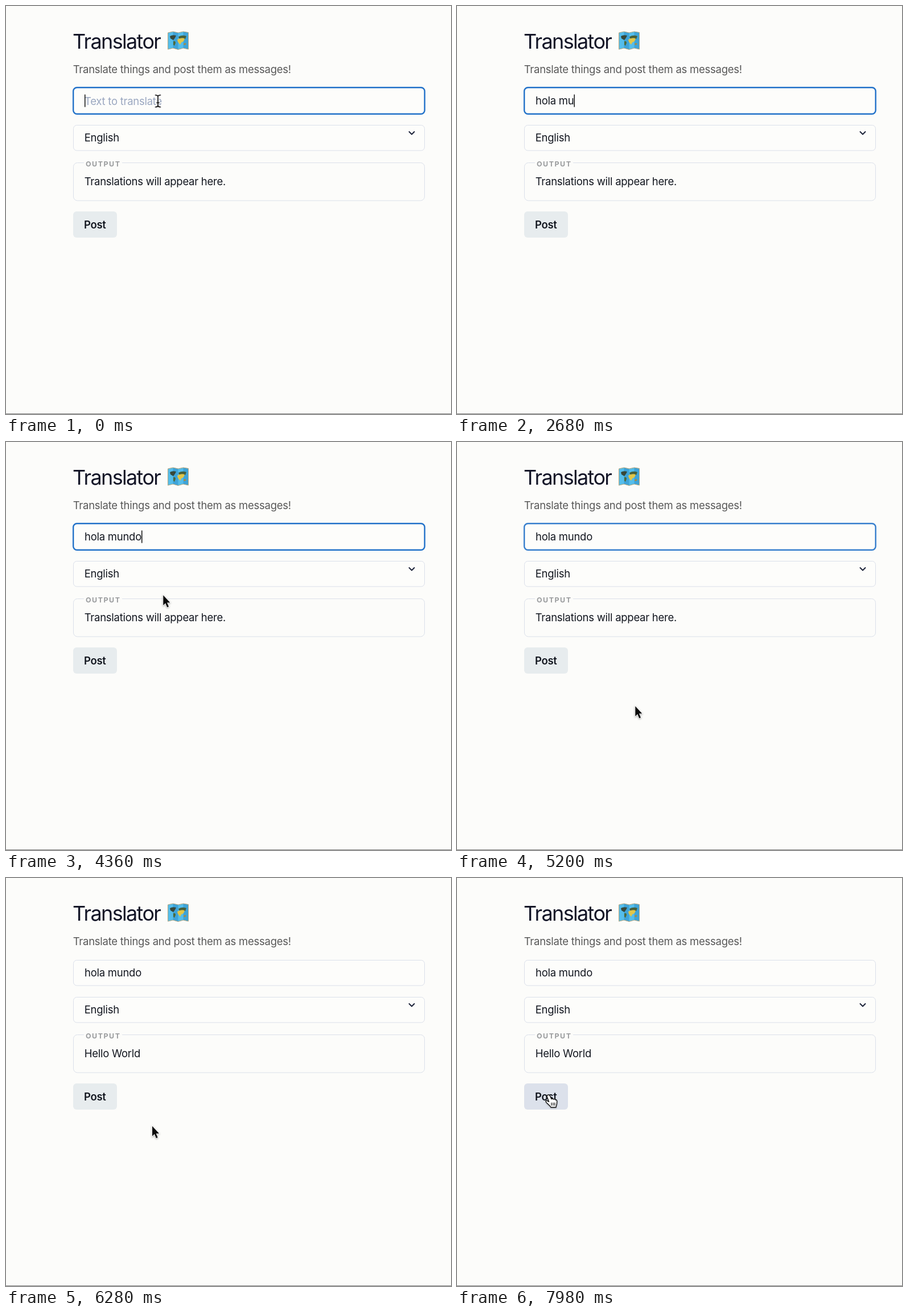
These frames come from a looping animation (782x717 px, 8000 ms). An HTML page:

```html
<!DOCTYPE html>
<html lang="en">
<head>
<meta charset="utf-8">
<title>Translator</title>
<style>
  html, body { margin: 0; width: 100%; height: 100%; overflow: hidden; background: #fcfcfa; }
  svg { display: block; width: 782px; height: 717px; }
  text {
    font: 400 18.5px Inter, "Open Sans", sans-serif;
    font-optical-sizing: none;
    letter-spacing: -.26px;
    white-space: pre;
    fill: #12161f;
  }
  .title { font-size: 36px; letter-spacing: -1.65px; fill: #131527; }
  .lead { fill: #585858; }
  .hint { fill: #9aa7c0; }
  .legend { font-size: 12.4px; font-weight: 700; letter-spacing: 1.55px; fill: #999b9d; }
  .post { font-weight: 600; letter-spacing: -.3px; }
  .box { fill: none; stroke: #dbe0ea; }
  .field { fill: #fdfdfb; }
</style>
</head>
<body>
<svg viewBox="0 0 782 717">
  <rect width="782" height="717" fill="#fcfcfa"/>
  <rect y="716" width="782" height="1" fill="#858583"/>

  <text class="title" x="117" y="75">Translator</text>
  <g id="map">
    <path fill="#55bdea" d="M284.500 47 293.500 45 302.500 47 311.500 45 320.500 46.500V76L311.500 74 302.500 76.500 293.500 74 284.500 76.500Z"/>
    <path fill="#3ea3d8" d="M293.500 45 302.500 47V76.500L293.500 74ZM311.500 45 320.500 46.500V76L311.500 74Z"/>
    <path fill="#37483a" d="M288 53Q293 50 299 52L297 56 294 60 289 57Z"/>
    <path fill="#4d6a3c" d="M294 62Q298 61 298 65L296 70 294 68Z"/>
    <path fill="#47603a" d="M303 54Q310 50 317 53L315 58 309 58 304 57Z"/>
    <path fill="#e2c648" d="M301 59Q307 55 314 57L312 62 308 64 306 68 302 63Z"/>
    <path fill="#a98c3c" d="M312 66Q316 64 317 67L313 69Z"/>
    <path fill="none" stroke="#b7a67c" d="M284.500 76V47L293.500 45 302.500 47 311.500 45 320.500 46.500V76L311.500 74 302.500 76.500 293.500 74Z"/>
  </g>
  <text class="lead" x="117.700" y="118">Translate things and post them as messages!</text>

  <rect id="field" class="box field" x="118.500" y="144.500" width="617" height="44.500" rx="6"/>
  <rect id="ring" x="118.200" y="143.200" width="617.500" height="46.600" rx="6.500" fill="#fdfdfb" stroke="#2272c9" stroke-width="2.400"/>
  <text id="hint" class="hint" x="138" y="174">Text to translate</text>
  <text id="typed" x="138" y="173"></text>
  <rect id="caret" y="155.500" width="1.500" height="22" fill="#111"/>

  <rect class="box field" x="118.500" y="209.500" width="617" height="44.500" rx="6"/>
  <text x="137.700" y="238">English</text>
  <path d="M708.500 221 713 225.500 717.500 221" fill="none" stroke="#1b2238" stroke-width="2" stroke-linecap="round" stroke-linejoin="round"/>

  <path class="box" d="M204 275.500H728.500a7 7 0 0 1 7 7V335a7 7 0 0 1-7 7H125.500a7 7 0 0 1-7-7V282.500a7 7 0 0 1 7-7H137"/>
  <text class="legend" x="140" y="282">OUTPUT</text>
  <text id="output" x="137.700" y="314.500"></text>

  <rect id="button" x="118" y="361" width="77" height="46" rx="6"/>
  <text class="post" x="137" y="391">Post</text>

  <g id="beam" fill="none" stroke-linecap="round">
    <path stroke="#fff" stroke-width="3.600" d="M-4.500-10.500Q-.5-10.500 0-8Q.5-10.500 4.500-10.500M0-8V8M-4.500 10.500Q-.5 10.500 0 8Q.5 10.500 4.500 10.500M-2 3H2"/>
    <path stroke="#111" stroke-width="1.700" d="M-4.500-10.500Q-.5-10.500 0-8Q.5-10.500 4.500-10.500M0-8V8M-4.500 10.500Q-.5 10.500 0 8Q.5 10.500 4.500 10.500M-2 3H2"/>
  </g>
  <path id="arrow" fill="#0a0a0a" stroke="#fff" stroke-width="1.600" paint-order="stroke" style="filter:drop-shadow(0 1px 1.500px #0005)" d="M.3 .3V18L4.200 14.300 7.200 21.500 10 20.300 7 13.200H12.300Z"/>
  <g id="hand" stroke="#111" stroke-width="1.400" stroke-linejoin="round" stroke-linecap="round" style="filter:drop-shadow(0 1px 1px #0004)">
    <path fill="#fff" d="M-1.500 .8C0-.5 2 0 2.800 1.600L5.500 7.500C7 6.600 8.800 7 9.300 8C10.800 7.200 12.200 8 12.600 9C14 8.600 15 9.500 15.200 11L15 15C15 17 13.800 18.500 13.500 22H4.500C4 20 1 18-2.500 14.500C-5 12.500-5 10.500-3.500 10.200C-2 10-.5 11 1 12.200L-2.200 3.500C-2.600 2.200-2.300 1.200-1.500 .8Z"/>
    <path fill="none" stroke-width="1.200" d="M5.500 14V18.500M8.500 14V18.500M11.300 14V18.500"/>
  </g>
</svg>
<script>
const LOOP = 8000;
const PHRASE = "hola mundo";
const KEY_TIMES = [60, 260, 980, 1240, 1560, 1840, 2400, 2800, 2980, 3240];
const BLUR = 5180, TRANSLATED = 6040, POINTER_BACK = 3540;

// Pointer hot spot: time, x, y
const POINTER = [
  [0, 267, 167], [3560, 267, 167], [3860, 271, 200], [4200, 276, 269],
  [4380, 276, 269], [4700, 300, 385], [5000, 313, 464], [6020, 313, 464],
  [6280, 257, 436], [6500, 194, 392], [6700, 172, 377.5],
  [7060, 172, 377.5], [7540, 160.5, 381]
];

const el = id => document.getElementById(id);
const [field, ring, hint, typed, caret, output, button] =
  ["field", "ring", "hint", "typed", "caret", "output", "button"].map(el);
const cursors = ["beam", "arrow", "hand"].map(el);
const show = (node, on) => node.setAttribute("visibility", on ? "visible" : "hidden");
const setText = (node, value) => { if (node.textContent !== value) node.textContent = value; };

function pointerAt(t) {
  const next = POINTER.findIndex(p => p[0] > t);
  if (next < 0) return POINTER.at(-1).slice(1);
  const [t0, x0, y0] = POINTER[next - 1], [t1, x1, y1] = POINTER[next];
  const k = (t - t0) / (t1 - t0);
  return [x0 + (x1 - x0) * k, y0 + (y1 - y0) * k];
}

function render(t) {
  const count = KEY_TIMES.filter(k => k <= t).length;
  setText(typed, PHRASE.slice(0, count));
  show(hint, count === 0);
  caret.setAttribute("x", 138 + (count ? typed.getComputedTextLength() : 0));
  show(caret, t < BLUR);
  ring.setAttribute("opacity", Math.max(0, Math.min(1, 1 - (t - BLUR) / 200)));
  // The border keeps a blue tint until the translation arrives.
  field.style.stroke = t < TRANSLATED ? "#c8d4e9" : "";
  setText(output, t < TRANSLATED ? "Translations will appear here." : "Hello World");

  const [x, y] = pointerAt(t);
  const hover = x < 195 && y > 361 && y < 407;
  button.setAttribute("fill", hover ? "#dce1eb" : "#e7ecee");
  const shape = y < 190 ? "beam" : hover ? "hand" : "arrow";
  const visible = t < KEY_TIMES[0] || t >= POINTER_BACK;
  for (const c of cursors) {
    show(c, visible && c.id === shape);
    c.setAttribute("transform", `translate(${x} ${y})`);
  }
}

const start = performance.now();
function tick() {
  render((performance.now() - start) % LOOP);
  requestAnimationFrame(tick);
}
tick();
</script>
</body>
</html>
```
